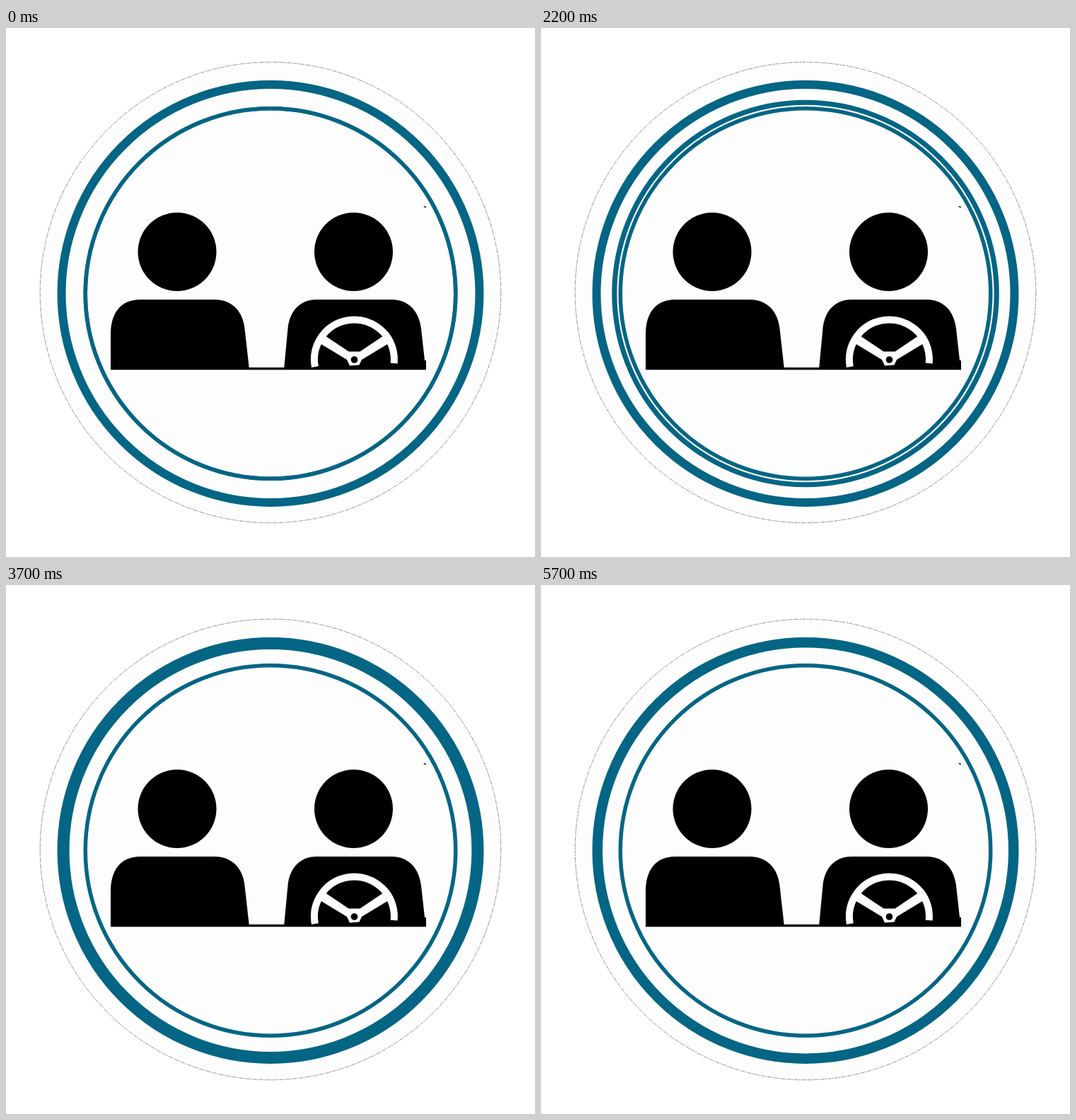
An HTML page with a canvas for the animation above (5750 ms loop, 748 by 748 pixels).

```html
<!DOCTYPE html>
<html lang="en">
<head>
<meta charset="utf-8">
<title>Two people in a car</title>
<style>
  html, body { margin: 0; width: 100%; height: 100%; overflow: hidden; background: #fff; }
  canvas { display: block; }
</style>
</head>
<body>
<canvas id="stage" width="748" height="748"></canvas>
<script>
const ctx = document.getElementById('stage').getContext('2d');
const LOOP = 5750, STEP = 80, PULSE = 12;
const BLUE = '#046584', PAPER = '#fdfdfd', INK = '#000';
const CX = 374, CY = 375.5;
const INNER = [259, 264.5], OUTER = [289.5, 301.5];

function disc(x, y, r, color) {
  ctx.fillStyle = color;
  ctx.beginPath();
  ctx.arc(x, y, r, 0, Math.PI * 2);
  ctx.fill();
}

function ring([a, b]) {
  ctx.strokeStyle = BLUE;
  ctx.lineWidth = b - a;
  ctx.beginPath();
  ctx.arc(CX, CY, (a + b) / 2, 0, Math.PI * 2);
  ctx.stroke();
}

function polygon(points, color) {
  ctx.fillStyle = color;
  ctx.beginPath();
  points.forEach(([x, y]) => ctx.lineTo(x, y));
  ctx.fill();
}

function plate() {
  disc(374, 374, 326, PAPER);
  ctx.strokeStyle = '#444';
  ctx.lineWidth = 0.6;
  ctx.setLineDash([5, 1.5, 2, 1]);
  ctx.beginPath();
  ctx.arc(374, 374, 325.8, 0, Math.PI * 2);
  ctx.stroke();
  ctx.setLineDash([]);
}

function passenger() {
  disc(242, 316.5, 55.5, INK);
  ctx.beginPath();
  ctx.moveTo(148, 483);
  ctx.lineTo(148, 434);
  ctx.bezierCurveTo(148, 403, 162, 384, 190, 384);
  ctx.lineTo(295, 384);
  ctx.bezierCurveTo(320, 384, 335, 401, 337.5, 425);
  ctx.lineTo(344, 483);
  ctx.fill();
}

function driver() {
  disc(491.5, 316.5, 55.5, INK);
  ctx.beginPath();
  ctx.moveTo(393, 483);
  ctx.lineTo(398.5, 425);
  ctx.bezierCurveTo(401, 401, 415, 384, 439, 384);
  ctx.lineTo(545, 384);
  ctx.bezierCurveTo(570, 384, 584, 401, 587, 425);
  ctx.lineTo(592, 470);
  ctx.lineTo(594, 470);
  ctx.lineTo(594, 483);
  ctx.fill();
}

function wheel() {
  const x = 492.5, y = 469;
  ctx.strokeStyle = PAPER;
  ctx.lineWidth = 10;
  ctx.beginPath();
  ctx.arc(x, y, 56.5, Math.PI - 0.18, Math.PI * 2 + 0.09);
  ctx.stroke();
  polygon([
    [451, 435], [484.5, 457.5], [500.5, 457.5], [534, 435], [541, 446],
    [503, 469], [499.5, 476.5], [486, 477.5], [482, 469], [444, 446]
  ], PAPER);
  disc(x, y, 4.8, INK);
}

function draw(time) {
  const p = Math.floor((time % LOOP) / STEP) % PULSE / PULSE;
  ctx.fillStyle = '#fff';
  ctx.fillRect(0, 0, 748, 748);
  plate();
  ring(OUTER);
  ring(INNER);
  ring(INNER.map((r, i) => r + (OUTER[i] - r) * p));
  passenger();
  driver();
  wheel();
  ctx.fillStyle = INK;
  ctx.fillRect(148, 480, 446, 3.3);
  polygon([[590, 252], [593, 252], [594, 254], [592.5, 254]], INK);
}

const start = performance.now();
function tick() {
  draw(performance.now() - start);
  requestAnimationFrame(tick);
}
tick();
</script>
</body>
</html>
```
